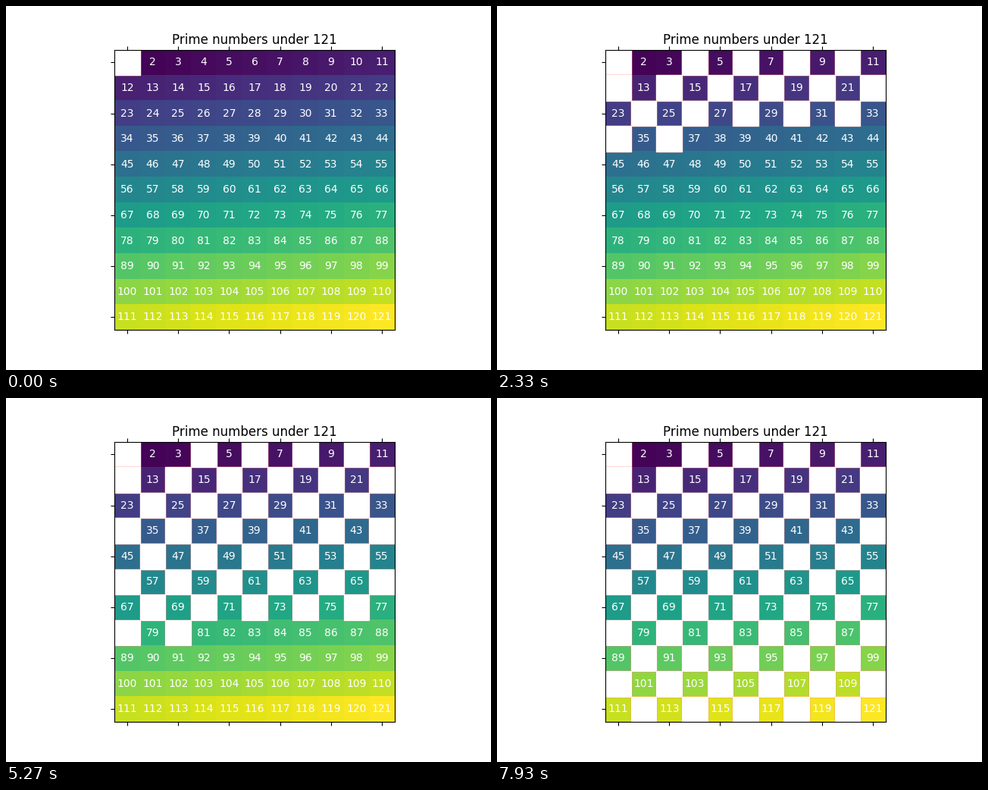
Write a matplotlib script that moves like this. It is 640 px wide and 480 px high and loops after 8000 ms.

```python
import numpy as np
import matplotlib.pyplot as plt
from matplotlib.animation import FuncAnimation
from matplotlib.patches import Rectangle

SIDE = 11
LAST = SIDE * SIDE
LOOP = 8000     # ms
STEPS = 120     # sieve steps in one loop
TICKS = 300     # drawn frames in one loop

grid = np.arange(1, LAST + 1).reshape(SIDE, SIDE)

fig, ax = plt.subplots(figsize=(6.4, 4.8), dpi=100)
ax.matshow(grid, cmap="viridis")
ax.tick_params(labeltop=False, labelbottom=False, labelleft=False)
ax.set_title(f"Prime numbers under {LAST}", pad=5.5)


def cell(n):
    row, col = divmod(n - 1, SIDE)
    return col, row


def cover(n, color):
    col, row = cell(n)
    return ax.add_patch(Rectangle((col - 0.5, row - 0.5), 1, 1, color=color))


labels = {n: ax.text(*cell(n), str(n), color="white", ha="center", va="center")
          for n in range(1, LAST + 1)}

# Each struck number gets a red cover, then a white one on top of it.
struck = [1, *range(4, LAST + 1, 2)]
covers = {n: (cover(n, "red"), cover(n, "white")) for n in struck}


def update(tick):
    """Even steps mark the next multiple of two, odd steps erase it."""
    step = min((tick + 1) * STEPS // TICKS, STEPS - 1)
    marked = step + 2 - step % 2
    erased = step + step % 2
    for n, (red, white) in covers.items():
        gone = n == 1 or n <= erased
        red.set_visible(gone or n <= marked)
        white.set_visible(gone)
        labels[n].set_visible(not gone)


anim = FuncAnimation(fig, update, frames=TICKS, interval=LOOP / TICKS,
                     repeat=True, repeat_delay=0)
plt.show()
```
